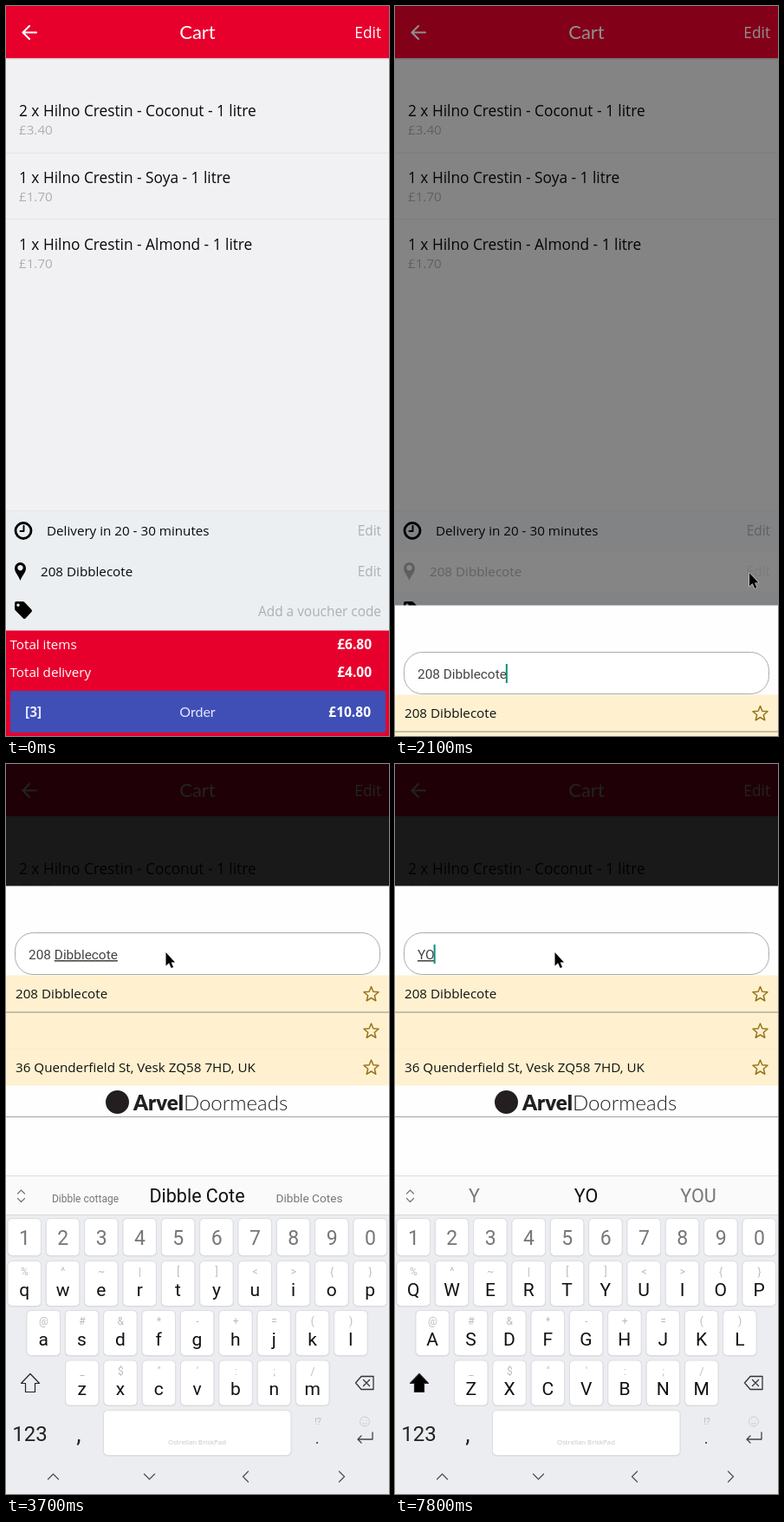
These frames come from a looping animation (442 px wide and 841 px high, 8000 ms). An HTML page:

```html
<!DOCTYPE html>
<html lang="en">
<head>
<meta charset="utf-8">
<title>Cart address entry</title>
<style>
  html, body { margin: 0; width: 100%; height: 100%; overflow: hidden; background: #fff; }
  svg { display: block; width: 100vw; height: 100vh; }
  text { font-family: "Open Sans", "Noto Sans", sans-serif; font-size: 15.2px; white-space: pre; }
  .title { font-family: Lato, sans-serif; }
  .ui { font-family: Roboto, sans-serif; }
  .bold { font-weight: 700; font-size: 15.5px; }
  .end { text-anchor: end; }
  .mid { text-anchor: middle; }
  .line { fill: none; stroke-linecap: round; stroke-linejoin: round; }
  .word { text-decoration: underline; text-decoration-thickness: 1px; }
</style>
</head>
<body>
<svg id="stage" viewBox="0 0 442 841" preserveAspectRatio="none"></svg>
<script>
const LOOP = 8000, STEP = 100;
const STREET = '208 Dibblecote';
const stage = document.getElementById('stage');

function el(parent, tag, attrs = {}, content = '') {
  const node = document.createElementNS('http://www.w3.org/2000/svg', tag);
  for (const name in attrs) node.setAttribute(name, attrs[name]);
  node.textContent = content;
  return parent.appendChild(node);
}
const group = (parent, attrs) => el(parent, 'g', attrs);
const rect = (parent, x, y, width, height, fill, more) =>
  el(parent, 'rect', { x, y, width, height, fill, ...more });
const path = (parent, d, attrs) => el(parent, 'path', { d, ...attrs });
const stroke = (parent, d, color, width) =>
  path(parent, d, { class: 'line', stroke: color, 'stroke-width': width });
function label(parent, x, y, content, fill, cls = '', size) {
  const node = el(parent, 'text', { x, y, fill, class: cls }, content);
  if (size) node.style.fontSize = size + 'px';
  return node;
}

// Piecewise linear track of [time, value...] points.
function track(points, t) {
  const next = points.findIndex(p => p[0] > t);
  if (next < 0) return points[points.length - 1].slice(1);
  if (next === 0) return points[0].slice(1);
  const a = points[next - 1], b = points[next];
  const k = (t - a[0]) / (b[0] - a[0]);
  return a.slice(1).map((v, i) => v + (b[i + 1] - v) * k);
}

// Cart
const RED = '#e8002d', GREY = '#adafb1';
const cart = group(stage);
rect(cart, 0, 0, 442, 841, '#f1f1f3');
rect(cart, 0, 60, 442, 1.5, '#d9c9cd');
rect(cart, 0, 0, 442, 60, RED);
stroke(cart, 'M35 30.5H20M27 23l-7.5 7.5L27 38', '#fff', 2.1);
label(cart, 221, 38, 'Cart', '#fff', 'title mid', 22);
label(cart, 433, 37, 'Edit', '#fff', 'end', 17.3);

[['2 x', 'Coconut', '£3.40'], ['1 x', 'Soya', '£1.70'], ['1 x', 'Almond', '£1.70']]
  .forEach(([count, flavour, price], i) => {
    const y = 127 + i * 76.8;
    label(cart, 15, y, `${count} Hilno Crestin - ${flavour} - 1 litre`, '#080808', '', 17.3);
    label(cart, 15, y + 21, price, GREY);
    if (i < 2) rect(cart, 0, Math.floor(y + 42), 442, 1, '#e4e3e4');
  });

rect(cart, 0, 581, 442, 139, '#ebeff2');
rect(cart, 0, 581, 442, 1, '#e2e6e8');
el(cart, 'circle', { cx: 20, cy: 604.5, r: 9, fill: 'none', stroke: '#000', 'stroke-width': 2.8 });
stroke(cart, 'M20.5 599v6h-4', '#000', 1.9);
label(cart, 47, 610, 'Delivery in 20 - 30 minutes', '#080808');
label(cart, 433, 610, 'Edit', GREY, 'end', 15.4);

const pressed = rect(cart, 0, 628, 442, 46, '#f2f3f4');
const addressRow = group(cart);
path(addressRow, 'M16.5 662C14.5 656 10 653 10 647.5a6.5 6.5 0 0 1 13 0C23 653 18.5 656 16.5 662zM16.5 644a3.2 3.2 0 1 0 .01 0z',
  { 'fill-rule': 'evenodd' });
label(addressRow, 40, 656.5, STREET, '#080808');
label(addressRow, 433, 656.5, 'Edit', GREY, 'end', 15.4);

path(cart, 'M10 688q0-2 2-2h7q1.500 0 2.500 1l8 8.500q1 1.500 0 2.500l-7 7.500q-1.500 1-2.500 0l-9-9q-1-1-1-2.500zM14 688.500a1.700 1.700 0 1 0 .01 0z',
  { 'fill-rule': 'evenodd' });
label(cart, 433, 703, 'Add a voucher code', GREY, 'end', 15.4);

rect(cart, 0, 719.5, 442, 122, RED);
[['Total items', '£6.80', 741], ['Total delivery', '£4.00', 773]].forEach(([name, sum, y]) => {
  label(cart, 4.5, y, name, '#fff');
  label(cart, 422, y, sum, '#fff', 'bold end');
});
rect(cart, 5, 789, 433, 48, '#3f4fb6', { rx: 1 });
label(cart, 22, 819, '[3]', '#e6e8ff', 'bold');
label(cart, 221, 818.5, 'Order', '#e6e8ff', 'title mid', 16);
label(cart, 421, 819, '£10.80', '#fff', 'bold end');

const dim = group(stage);
rect(dim, 0, 0, 442, 60, '#000', { opacity: .865 });
rect(dim, 0, 60, 442, 781, '#000', { opacity: .895 });

// Address sheet
const sheet = group(stage);
rect(sheet, 0, .5, 442, 841, '#fefefe');
rect(sheet, 10.5, 54.5, 421, 48, '#fff', { rx: 21, stroke: '#aaa' });
const hint = label(sheet, 26, 85, 'Enter your postcode', '#bcbcbc', 'ui');
const entry = label(sheet, 26, 85, '', '#444', 'ui', 15.4);
const entryHead = el(entry, 'tspan');
const entryWord = el(entry, 'tspan', { class: 'word' });
const caret = rect(sheet, 0, 68, 2, 22, '#0b8f7c');

rect(sheet, 0, 103.5, 442, 127, '#fff1d0');
rect(sheet, 0, 145.5, 442, 1, '#8f8c86');
rect(sheet, 0, 188, 442, 1, '#f8ebcd');
label(sheet, 11, 130, STREET, '#111');
label(sheet, 11, 214.5, '36 Quenderfield St, Vesk ZQ58 7HD, UK', '#111');
const starPoints = Array.from({ length: 10 }, (_, i) => {
  const r = i % 2 ? 4 : 9, a = (i / 5 - .5) * Math.PI;
  return [421.5 + r * Math.cos(a), r * Math.sin(a)].map(v => v.toFixed(2)).join();
}).join(' ');
[125.5, 168, 210].forEach(y => el(sheet, 'polygon', {
  points: starPoints, transform: `translate(0 ${y})`, class: 'line', stroke: '#98741a', 'stroke-width': 1.5
}));
el(sheet, 'circle', { cx: 128.5, cy: 249.5, r: 13.5, fill: '#231f20' });
const brand = label(sheet, 147, 259, '', '#231f20', 'title', 24);
el(brand, 'tspan', { 'font-weight': 900 }, 'Arvel');
el(brand, 'tspan', { 'font-weight': 300 }, 'Doormeads');
rect(sheet, 0, 266, 442, 1, '#a3a3a3');

// Keyboard
const keyboard = group(stage);
rect(keyboard, 0, 474, 442, 46, '#fafafb');
rect(keyboard, 0, 474, 442, 1, '#dedee0');
rect(keyboard, 0, 519, 442, 322, '#ecedf1');
rect(keyboard, 0, 519, 442, 1, '#d9dade');
stroke(keyboard, 'M13.500 495l4-4 4 4M13.500 500.500l4 4 4-4', '#777', 1.2);
const suggestions = [91.5, 220.5, 350].map((x, i) =>
  label(keyboard, x, 504.5, '', i === 1 ? '#111' : '#777', 'ui mid'));

function key(x, y, width, height) {
  rect(keyboard, x, y + .5, width, height, '#d9dade', { rx: 5 });
  rect(keyboard, x + .5, y + .5, width - 1, height - 1, '#fff', { rx: 5, stroke: '#dcdde1', 'stroke-width': 1 });
}
const PITCH = 44.33;
const letters = [];
[...'1234567890'].forEach((digit, i) => {
  const x = 1.5 + i * PITCH;
  key(x, 523, 39.5, 44);
  label(keyboard, x + 20, 553.5, digit, '#777', 'ui mid', 23);
});
[['qwertyuiop', '%^~|[]<>{}', 1.5, 572], ['asdfghjkl', '@#&*-+=()', 23.5, 629], ['zxcvbnm', '_$"\':;/', 68, 686.5]]
  .forEach(([row, marks, left, y]) => [...row].forEach((char, i) => {
    const x = left + i * PITCH;
    key(x, y, 39.5, 53);
    label(keyboard, x + 20, y + 17, marks[i], '#bbb', 'ui mid', 12);
    letters.push([label(keyboard, x + 19.7, y + 40.5, char, '#111', 'ui mid', 21), char]);
  }));
const shift = path(keyboard, 'M28 702.500L38.500 713.500H33.500V723.500H22.500V713.500H17.500z',
  { stroke: '#222', 'stroke-width': 1.2, 'stroke-linejoin': 'round' });
stroke(keyboard, 'M410 705.500h14v15h-14l-6.500-7.500zM412.500 709.500l7 7m0-7l-7 7', '#333', 1.3);
key(112, 744, 217.5, 53);
label(keyboard, 220.5, 784, 'Ostrellan BriskPad', '#c4c4c8', 'mid', 7.8);
label(keyboard, 27.5, 779.5, '123', '#222', 'ui mid', 24);
label(keyboard, 84, 781, ',', '#222', 'ui mid', 27);
label(keyboard, 360, 761, '!?', '#bbb', 'ui mid', 10.5);
label(keyboard, 359, 783, '.', '#333', 'ui mid', 18);
el(keyboard, 'circle', { cx: 414, cy: 757.5, r: 5.5, fill: 'none', stroke: '#ccc' });
stroke(keyboard, 'M411.500 759.500q2.500 2 5 0M412 756v.2M416 756v.2', '#ccc', 1);
stroke(keyboard, 'M423 770v8h-17M410 774l-4 4 4 4', '#444', 1.3);
stroke(keyboard, 'M48.500 824l6-6 6 6M159.500 818l6 6 6-6M279.500 815l-6 6 6 6M384.500 815l6 6-6 6', '#555', 1.3);

const pointer = path(stage, 'M0 0V15.500L3.600 12.300 6.200 18 8.600 17 6.100 11.400H10.500z',
  { stroke: '#fff', 'stroke-width': 1, 'paint-order': 'stroke' });

// Motion
const POINTER = [[700, 444, 742], [900, 423, 672], [1300, 407, 648], [1500, 407, 648], [1600, 409, 653],
  [2600, 409, 653], [3000, 290, 425], [3300, 196, 192], [3500, 184.5, 214], [3600, 184.5, 217]];
const SHEET = [[2000, 841], [2100, 690], [2200, 541], [2400, 140]];
const KEYBOARD = [[2200, 370], [2400, 0]];
const DIM = [[2000, 0], [2200, 1]];
const PRESS = [[1700, 0], [1900, 1]];
const EDITS = [[2200, STREET],
  ...[13, 12, 11, 10].map((n, i) => [4000 + i * 100, STREET.slice(0, n)]),
  ...[8, 6, 4, 2, 0].map((n, i) => [4500 + i * 100, STREET.slice(0, n)]),
  [6700, 'Y'], [6800, 'YO']];

function suggest(text) {
  if (text === STREET) return ['Dibble cottage', 'Dibble Cote', 'Dibble Cotes'];
  if (!text) return ['I', 'hey', 'no'];
  if (text[0] === 'Y') return ['Y', 'YO', 'YOU'];
  const word = text.trim().split(' ').pop();
  return [word.toLowerCase(), word, word + 's'];
}
function suggestionSize(text, i) {
  if (i === 1) return 21.5;
  return text.length < 5 ? 21.5 : text.length < 13 ? 13.7 : 12;
}
const show = (node, visible) => node.setAttribute('visibility', visible ? 'inherit' : 'hidden');
const move = (node, x, y) => node.setAttribute('transform', `translate(${x} ${y})`);

function render(t) {
  const [press] = track(PRESS, t);
  pressed.setAttribute('opacity', press);
  addressRow.setAttribute('opacity', 1 - .72 * press);
  dim.setAttribute('opacity', track(DIM, t)[0]);
  move(sheet, 0, track(SHEET, t)[0]);
  move(keyboard, 0, track(KEYBOARD, t)[0]);
  show(sheet, t > 2000);
  show(keyboard, t > 2200);
  show(pointer, t >= 700);
  move(pointer, ...track(POINTER, t));

  const [edited, text] = EDITS.filter(e => e[0] <= t).pop() || EDITS[0];
  const split = t < 2300 ? text.length : text.trimEnd().lastIndexOf(' ') + 1;
  entryHead.textContent = text.slice(0, split);
  entryWord.textContent = text.slice(split);
  show(hint, !text);
  show(caret, Math.floor(Math.max(0, t - edited) / 500) % 2 === 0);
  caret.setAttribute('x', 26 + (text ? entry.getComputedTextLength() - 1 : 0));

  suggest(text).forEach((word, i) => {
    suggestions[i].textContent = word;
    suggestions[i].style.fontSize = suggestionSize(word, i) + 'px';
  });
  const upper = t >= 6700;
  letters.forEach(([node, char]) => node.textContent = upper ? char.toUpperCase() : char);
  shift.setAttribute('fill', upper ? '#000' : 'none');
}

function tick() {
  render(Math.floor(performance.now() % LOOP / STEP) * STEP);
  requestAnimationFrame(tick);
}
tick();
</script>
</body>
</html>
```
